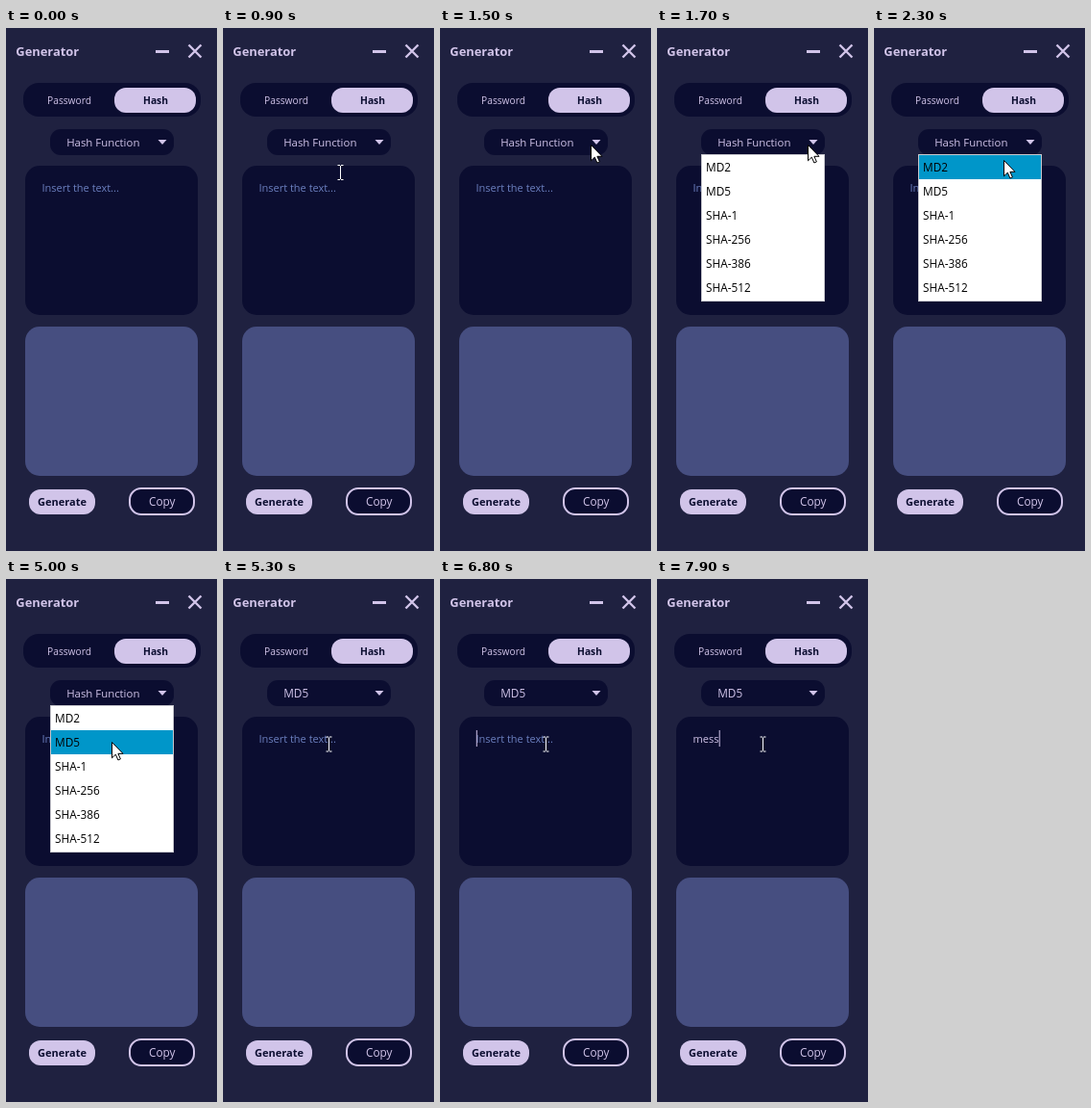
Recreate the animation shown at these times as an HTML page. Size 220 px wide and 543 px high, loop 8000 ms.

```html
<!DOCTYPE html>
<html lang="en">
<head>
<meta charset="utf-8">
<title>Generator</title>
<style>
  html, body { margin: 0; width: 100%; height: 100%; overflow: hidden; background: #1f2140; }
  svg { display: block; width: 220px; height: 543px; font-family: "Open Sans", "Noto Sans", sans-serif; }
  .dark { fill: #0b0d30; }
  .light { fill: #d1c4e9; }
  .bold { font-weight: 700; }
  .mid { text-anchor: middle; }
  .line { fill: none; stroke: #d1c4e9; }
</style>
</head>
<body>
<svg viewBox="0 0 220 543">
  <rect width="220" height="543" fill="#1f2140"/>
  <text class="light bold" x="10.3" y="28.5" font-size="12.9">Generator</text>
  <path class="line" stroke-width="3" d="M156 24.5h14"/>
  <path class="line" stroke-width="2.4" d="M190.5 17.5l13 13m0-13l-13 13"/>

  <rect class="dark" x="18" y="57" width="185" height="35" rx="16"/>
  <rect class="light" x="113" y="62" width="85" height="26" rx="12"/>
  <text class="light mid" x="66" y="79" font-size="10.2">Password</text>
  <text class="dark bold mid" x="156" y="79" font-size="10.3">Hash</text>

  <rect class="dark" x="46" y="105" width="129" height="27" rx="11"/>
  <text id="choice" class="light" x="63.2" y="123"></text>
  <path class="light" d="M158.5 116h9l-4.5 5z"/>

  <rect class="dark" x="20" y="143" width="180" height="155" rx="15"/>
  <text id="input" x="37.5" y="170" font-size="11"></text>
  <rect id="caret" class="light" y="157" width="1" height="17"/>

  <rect x="20" y="310" width="180" height="155" rx="15" fill="#464e80"/>
  <rect class="light" x="24" y="479" width="69" height="26" rx="12"/>
  <text class="dark bold mid" x="58.5" y="496" font-size="11">Generate</text>
  <rect class="dark" x="129" y="478" width="67" height="27" rx="12" stroke="#d1c4e9" stroke-width="2"/>
  <text class="light mid" x="162.7" y="496" font-size="11.8">Copy</text>

  <g id="menu" font-size="11.8">
    <rect x="46.5" y="131.5" width="128" height="152" fill="#fff" stroke="#c9c9cf"/>
    <rect id="hover" x="47" width="127" height="25" fill="#0096c9"/>
  </g>

  <path id="arrow" d="M.5 .5V16.8L4.3 13.2L6.9 19L9.4 17.9L6.9 12.3H12z" fill="#fff" stroke="#000" stroke-linejoin="round"/>
  <path id="beam" d="M-3 -7.5h2.5m1 0h2.5M-3 7.5h2.5m1 0h2.5M0 -7v14" fill="none" stroke="#fff"/>
</svg>
<script>
const $ = id => document.getElementById(id);
const ROW_TOP = 132, ROW = 25;

["MD2", "MD5", "SHA-1", "SHA-256", "SHA-386", "SHA-512"].forEach((name, i) => {
  const label = document.createElementNS("http://www.w3.org/2000/svg", "text");
  label.textContent = name;
  label.setAttribute("x", 51);
  label.setAttribute("y", 149 + i * ROW);
  $("menu").append(label);
});

// Pointer steps: time, x, y, shape
const moves = [
  [0, 0, 0, ""],
  [400, 42, 20, "arrow"], [500, 72, 92, "arrow"], [600, 107.5, 173, "beam"],
  [900, 122.5, 150, "beam"], [1000, 147, 113, "arrow"], [1100, 162, 98, "arrow"], [1200, 157, 121, "arrow"],
  [2300, 135, 137, "arrow"], [2500, 114, 161, "arrow"], [2600, 110, 168, "arrow"],
  [5000, 110, 169, "arrow"], [5100, 110, 170, "arrow"], [5300, 110.5, 171.5, "beam"]
];
const keys = [7200, 7400, 7700, 7900];
const caretX = [37.8, 47.7, 54.4, 59.6, 64.7];

const show = (id, on) => $(id).setAttribute("visibility", on ? "visible" : "hidden");
const put = (id, text) => { if ($(id).textContent !== text) $(id).textContent = text; };

function draw(t) {
  const [, x, y, shape] = moves.findLast(m => m[0] <= t);
  for (const id of ["arrow", "beam"]) {
    show(id, id === shape);
    $(id).setAttribute("transform", `translate(${x} ${y})`);
  }

  const open = t >= 1700 && t < 5300;
  const row = Math.floor((y - ROW_TOP) / ROW);
  show("menu", open);
  show("hover", open && row >= 0);
  $("hover").setAttribute("y", ROW_TOP + row * ROW);

  const chosen = t >= 5300;
  put("choice", chosen ? "MD5" : "Hash Function");
  $("choice").setAttribute("font-size", chosen ? 11.8 : 11.4);

  const typed = keys.filter(k => k <= t).length;
  put("input", typed ? "mess".slice(0, typed) : "Insert the text...");
  $("input").setAttribute("fill", typed ? "#d1c4e9" : "#6c80c0");
  show("caret", (t >= 5900 && t < 6300) || t >= 6800);
  $("caret").setAttribute("x", caretX[typed]);
}

function loop() {
  draw(performance.now() % 8000);
  requestAnimationFrame(loop);
}
loop();
</script>
</body>
</html>
```
